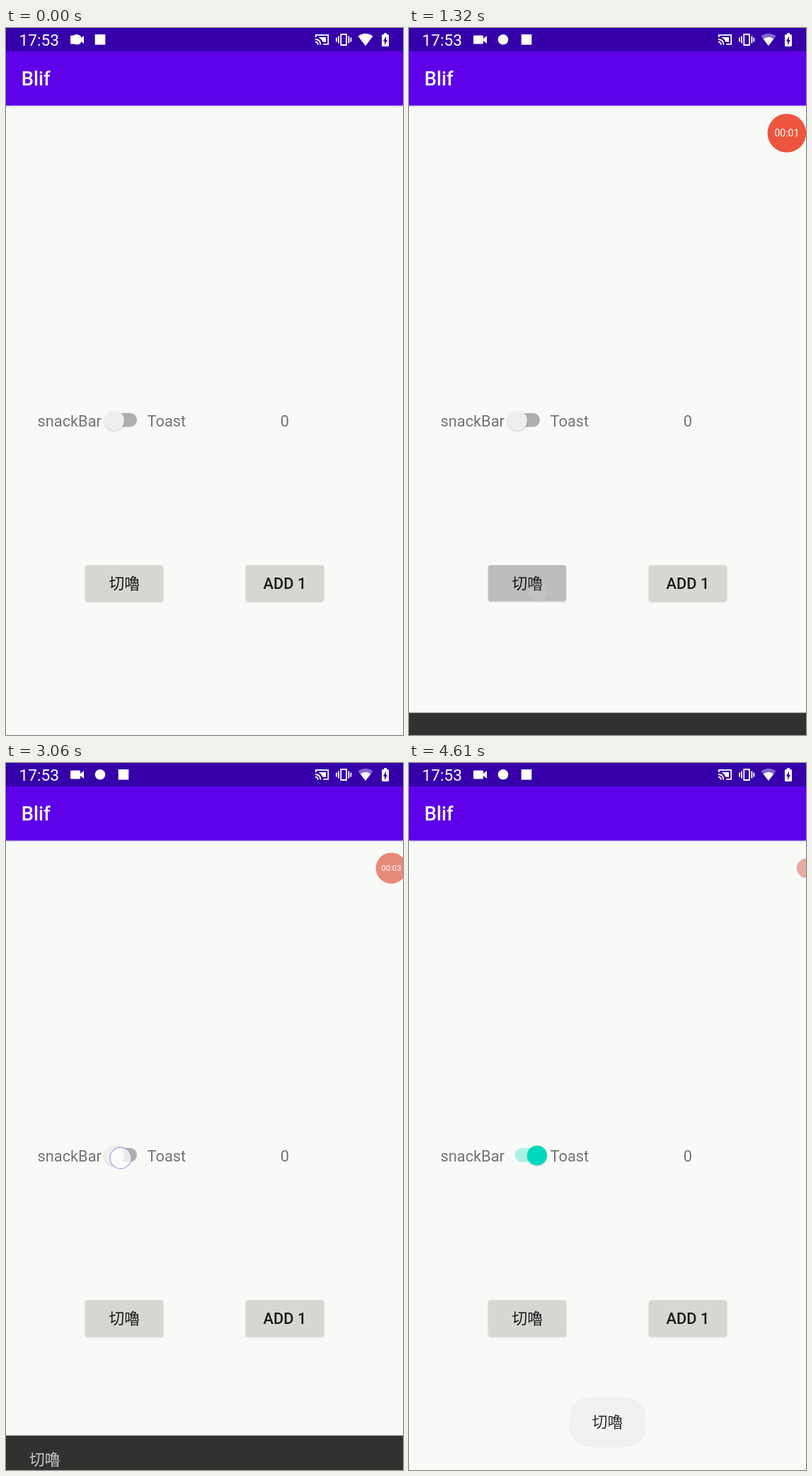
These frames come from a looping animation (561x997 px, 4690 ms). An HTML page:

```html
<!DOCTYPE html>
<html lang="zh-Hant">
<head>
<meta charset="utf-8">
<title>Snackbar and toast demo</title>
<style>
html, body { margin: 0; width: 100%; height: 100%; overflow: hidden; background: #f8faf7; }
svg { display: block; width: 100%; height: 100%; }
text { font-family: Roboto, "Noto Sans CJK TC", "Noto Sans CJK", sans-serif; font-size: 21.8px; }
.cjk { font-family: "Noto Sans CJK TC", "Noto Sans CJK", sans-serif; }
.label { fill: #737573; }
.mid { text-anchor: middle; }
.medium { font-weight: 500; }
</style>
</head>
<body>
<svg viewBox="0 0 561 997">
  <defs>
    <linearGradient id="shade" x2="0" y2="1">
      <stop offset="0" stop-color="#000" stop-opacity=".07"/>
      <stop offset="1" stop-color="#000" stop-opacity="0"/>
    </linearGradient>
    <filter id="drop" x="-20%" y="-20%" width="140%" height="150%">
      <feDropShadow dx="0" dy="1.2" stdDeviation=".9" flood-opacity=".22"/>
    </filter>
  </defs>

  <rect width="561" height="997" fill="#f8faf7"/>
  <rect y="109.5" width="561" height="4" fill="url(#shade)"/>
  <rect y="33" width="561" height="76.5" fill="#5e00e8"/>
  <rect width="561" height="33" fill="#3500aa"/>

  <!-- status bar -->
  <g fill="#fff">
    <text x="18.4" y="25" style="font-size:22.7px">17:53</text>
    <path d="M92.5 10.5h11q1.5 0 1.5 1.5v3l5-4v11l-5-4v3q0 1.5-1.5 1.5h-11q-1.5 0-1.5-1.5v-9q0-1.5 1.5-1.5z"/>
    <g id="notices">
      <circle cx="133" cy="16.3" r="7.3"/>
      <rect x="158.7" y="9" width="14.6" height="14.6"/>
    </g>
    <g fill="none" stroke="#fff" stroke-width="1.8">
      <path d="M437.9 13v-3.2h17.4v13h-7M437 16q7 0 7.5 7.6M437 19.6q3.6 0 4 4"/>
      <path d="M441.5 13h10.6v6.7h-4.5q-2-4.5-6.1-6.7z" fill="#fff" stroke="none"/>
      <path d="M473.3 9h7.8v15h-7.8zM470 11.5v10M484.4 11.5v10M467 13.5v6M487.4 13.5v6"/>
    </g>
    <path id="wifi" d="M497.5 11.5Q508 4 518.5 11.5L508 25Z"/>
    <path d="M500.7 15.6Q508 10 515.3 15.6L508 25Z"/>
    <path d="M534.3 7h3.6v2h1.6q1.5 0 1.5 1.5v14q0 1.5-1.5 1.5h-7q-1.5 0-1.5-1.5v-14q0-1.5 1.5-1.5h1.8z"/>
    <path d="M537 11.5v5.5h2l-4 7v-5.2h-2z" fill="#3500aa"/>
    <text class="medium" x="21.8" y="81" style="font-size:27.3px">Blif</text>
  </g>

  <!-- switch row -->
  <text class="label" x="44.5" y="561.5">snackBar</text>
  <rect id="track" x="149.5" y="543" width="35.5" height="19.5" rx="9.75"/>
  <circle id="thumb" cy="553.4" r="14" filter="url(#drop)"/>
  <text class="label" x="199.5" y="561.5">Toast</text>
  <text class="label mid" x="394" y="561.5">0</text>

  <!-- buttons -->
  <rect id="button" x="112" y="757.5" width="110" height="50.5" rx="3" filter="url(#drop)"/>
  <rect x="339" y="757.5" width="110" height="50.5" rx="3" fill="#d5d7d3" filter="url(#drop)"/>
  <text class="cjk mid" x="167.3" y="791" fill="#1a1a1a">切嚕</text>
  <text class="medium mid" x="394" y="791" fill="#1a1a1a">ADD 1</text>

  <g id="snack">
    <rect width="561" height="68" fill="#313230"/>
    <text id="snackText" class="cjk" x="33" y="42" fill="#fff">切嚕</text>
  </g>

  <g id="toast">
    <rect x="226" y="894" width="109" height="71" rx="29" fill="#f1f2ef"/>
    <text id="toastText" class="cjk mid" x="280.5" y="937" fill="#303030">切嚕</text>
  </g>

  <circle id="tap" r="15" fill="#fff" fill-opacity=".75" stroke="#aaa4dc" stroke-width="1.3"/>

  <g id="badge">
    <circle id="disc" r="27.3"/>
    <text id="clock" class="mid" y="5" fill="#fff" style="font-size:14px"></text>
  </g>
</svg>

<script>
const LOOP = 4690, STEP = 80;

// The picture updates every STEP inside these spans and holds between them
const spans = [[0, 480], [640, 640], [1080, 1560], [2070, 2230],
               [3060, 3460], [4040, 4530], [4610, 4610]];
const PRESS_1 = 1080, TOGGLE = 3060, PRESS_2 = 4040;

function snap(now) {
  const [start, end] = spans.filter(span => span[0] <= now).pop();
  return start + Math.floor((Math.min(now, end) - start) / STEP) * STEP;
}

const linear = (t, start, length) => Math.min(1, Math.max(0, (t - start) / length));
const smooth = (...span) => {
  const k = linear(...span);
  return k * k * (3 - 2 * k);
};
const mix = (a, b, k) => `color-mix(in srgb, ${b} ${k * 100}%, ${a})`;

function set(id, attrs) {
  const node = document.getElementById(id);
  for (const name in attrs) node.setAttribute(name, attrs[name]);
  return node;
}
const fill = (id, color) => { document.getElementById(id).style.fill = color; };

function drawBadge(t) {
  const appear = smooth(t, 80, 240), shrink = smooth(t, 2000, 230), tuck = smooth(t, TOGGLE, 240);
  const x = 533.9 + 10.6 * shrink + 17 * tuck;
  const size = .55 + .45 * appear - .2 * shrink - .3 * tuck;
  set("badge", { transform: `translate(${x} 148.3) scale(${size})`, opacity: appear });
  fill("disc", mix(mix("#ee553f", "#e88a79", shrink), "#e4aca3", tuck));
  set("clock", { opacity: 1 - tuck }).textContent =
    t < 640 ? "00:00" : t < 2070 ? "00:01" : "00:03";
}

function drawTouch(t) {
  const start = t < TOGGLE ? PRESS_1 : t < PRESS_2 ? TOGGLE : PRESS_2;
  const spot = start === TOGGLE ? "162 557" : "182 795";
  set("tap", { transform: `translate(${spot})`, opacity: t < start ? 0 : 1 - linear(t, start, 270) });
  const pressed = start === TOGGLE ? 0 : smooth(t, start, STEP) - smooth(t, start + 240, 240);
  fill("button", mix("#d5d7d3", "#bbbdba", pressed));
}

function drawSwitch(t) {
  const on = smooth(t, TOGGLE, 240), settle = smooth(t, PRESS_2, 160);
  set("thumb", { cx: 153 + 28 * on });
  fill("thumb", mix("#eeefed", mix("#14dbc1", "#03d8be", settle), on));
  fill("track", mix("#aeafac", mix("#b0e0d7", "#aaf0e5", settle), on));
}

function drawMessages(t) {
  const rise = smooth(t, 1205, 240), drop = smooth(t, 2998, 180);
  set("snack", { transform: `translate(0 ${997 - 67 * (rise - drop)})` });
  set("snackText", { opacity: smooth(t, 1360, 180) - drop });
  set("toast", { opacity: linear(t, 4200, 320) });
  set("toastText", { opacity: linear(t, 4200, 400) });
}

function draw(t) {
  set("notices", { transform: `translate(${33 * smooth(t, 40, 320) - 33})` });
  set("wifi", { opacity: t < PRESS_1 ? 1 : .4 });
  drawBadge(t);
  drawTouch(t);
  drawSwitch(t);
  drawMessages(t);
}

const begin = performance.now();
function frame() {
  draw(snap((performance.now() - begin) % LOOP));
  requestAnimationFrame(frame);
}
frame();
</script>
</body>
</html>
```
